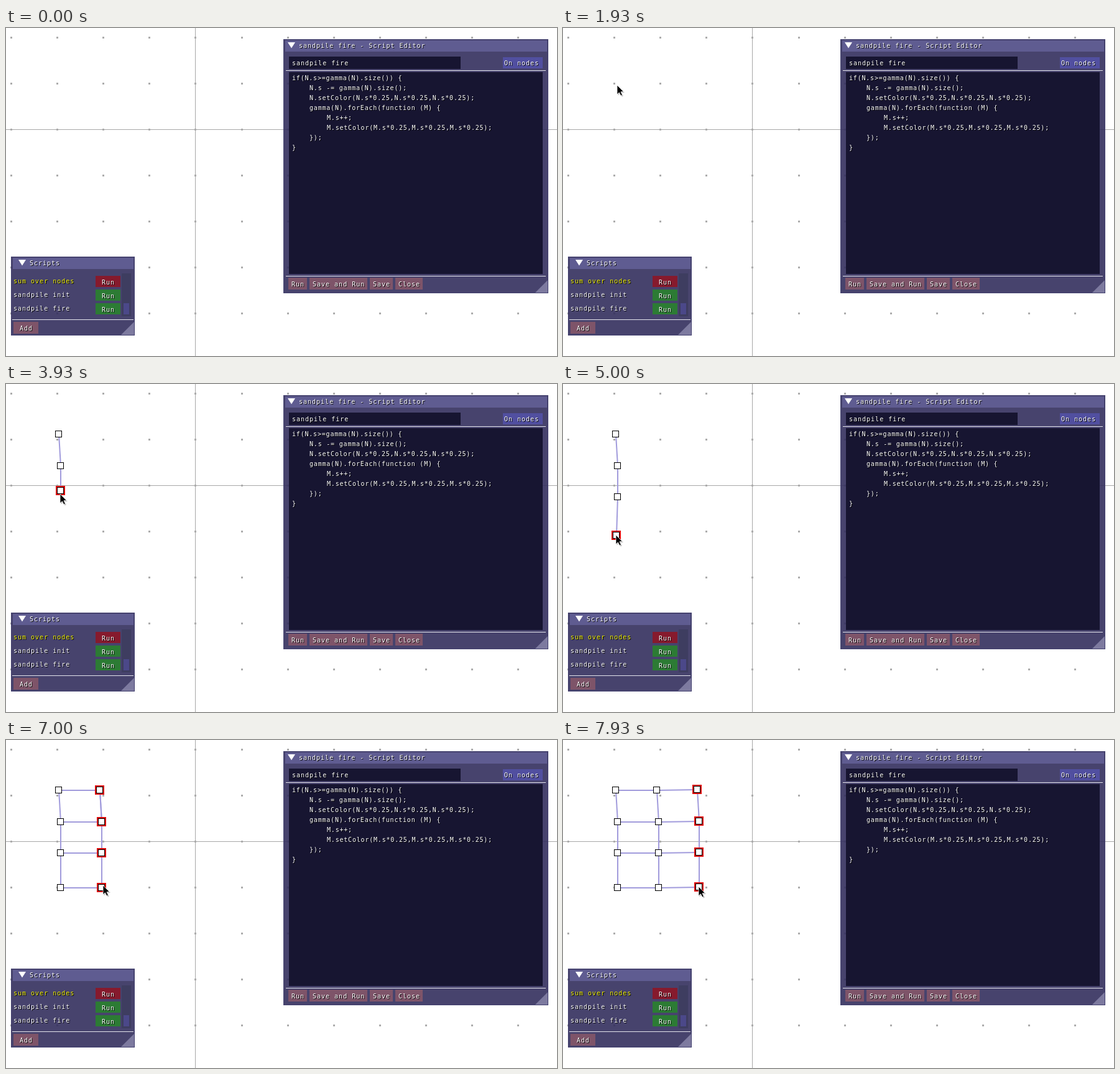
Write an HTML page with a canvas that moves like this. It is 886 px wide and 528 px high and loops after 8000 ms.

```html
<!DOCTYPE html>
<html lang="en">
<head>
<meta charset="utf-8">
<title>Sandpile script editor</title>
<style>
html, body { margin: 0; width: 100%; height: 100%; overflow: hidden; background: #fff; }
canvas { display: block; width: 886px; height: 528px; }
</style>
</head>
<body>
<canvas id="stage" width="886" height="528"></canvas>
<script>
const LOOP = 8000, STEP = 200 / 3, CELL = 7;
const DARK = '#171531', ROSE = '#7e5469', RULE = '#e4e4ec';
const g = document.getElementById('stage').getContext('2d');

const CODE = `if(N.s>=gamma(N).size()) {
    N.s -= gamma(N).size();
    N.setColor(N.s*0.25,N.s*0.25,N.s*0.25);
    gamma(N).forEach(function (M) {
        M.s++;
        M.setColor(M.s*0.25,M.s*0.25,M.s*0.25);
    });
}`.split('\n');

// Hand strokes: start, end, and the point reached; the hand rests in between
const APPEAR = 730, ORIGIN = [301, 55];
const STROKES = [
  [933, 1333, 27, 92], [1333, 1467, 88, 98], [1867, 2133, 84, 80],
  [2800, 3267, 87, 131], [3533, 4033, 87, 181], [4200, 4667, 85, 243], [5000, 5067, 87, 237],
  [6000, 6133, 98, 230], [6133, 6400, 130, 238], [6533, 6800, 153, 237],
  [6933, 7133, 160, 230], [7133, 7400, 201, 236], [7400, 7733, 250, 236], [7733, 7867, 218, 236]
];
// Four single nodes, then two copied columns; each is dragged until the next one is born
const ROWS = 4, BORN = [2467, 2867, 3533, 4267, 6067, 7000, LOOP];
const SELECT_ALL = 5730;

function hand(t) {
  let [x, y] = ORIGIN;
  for (const [start, end, toX, toY] of STROKES) {
    if (t <= start) break;
    const p = 1 - (1 - Math.min(1, (t - start) / (end - start))) ** 1.5;
    x += (toX - x) * p;
    y += (toY - y) * p;
  }
  return [Math.round(x), Math.round(y)];
}

// Dragged things trail the hand by one step
const dragged = (i, t) => hand(Math.min(t, BORN[i + 1]) - STEP);

function columnsAt(t) {
  const count = BORN.filter(b => t >= b - 5).length;
  const columns = [];
  for (let i = 0; i < count; i++) {
    const p = dragged(i, t);
    if (i === 0) columns.push([p]);
    else if (i < ROWS) columns[0].push(p);
    else {
      const prev = columns[columns.length - 1], foot = prev[ROWS - 1];
      columns.push(prev.map(([x, y]) => [x + p[0] - foot[0], y + p[1] - foot[1]]));
    }
  }
  return columns;
}

function box(x, y, w, h, color) {
  g.fillStyle = color;
  g.fillRect(x, y, w, h);
}

function poly(points, color) {
  g.beginPath();
  points.forEach(([x, y]) => g.lineTo(x, y));
  g.closePath();
  g.fillStyle = color;
  g.fill();
}

function label(s, x, y, color = '#fff', spacing = 1) {
  g.font = '10px "DejaVu Sans Mono", monospace';
  g.letterSpacing = spacing + 'px';
  g.fillStyle = '#000';
  g.fillText(s, x + 1, y + 1);
  g.fillStyle = color;
  g.fillText(s, x, y);
}

// Returns the width, so that buttons can be set in a row
function button(s, x, y, h, color, pad) {
  const w = s.length * CELL + 2 * pad;
  box(x, y, w, h, color);
  label(s, Math.round(x + pad), y + 14);
  return w;
}

function grid() {
  box(0, 0, 886, 528, '#fff');
  box(304, 0, 1, 528, '#a8a8a8');
  box(0, 163, 886, 1, '#a8a8a8');
  for (let i = 0; i < 12; i++)
    for (let j = 0; j < 7; j++)
      box(Math.round(7 + i * 74.1), 14 + j * 74, 3, 3, '#adadad');
}

function panel(title, x, y, w, h, indent, grip) {
  const right = x + w - 1, bottom = y + h - 1, tx = x + indent, ty = y + 5;
  box(x, y, w, h, 'rgba(52,47,94,.9)');
  g.strokeStyle = '#42406f';
  g.lineWidth = 1;
  g.strokeRect(x + .5, y + .5, w - 1, h - 1);
  box(x + 3, y + 2, w - 5, 18, '#5f5c91');
  poly([[right, bottom - grip], [right, bottom], [right - grip, bottom]], '#7d7a9f');
  poly([[tx, ty], [tx + 12, ty], [tx + 6, ty + 9.5]], '#fff');
  label(title, tx + 18, y + 14);
}

function editor() {
  panel('sandpile fire - Script Editor', 446, 18, 426, 409, 7, 20);
  box(455, 46, 276, 20, DARK);
  label('sandpile fire', 460, 60);
  box(799, 47, 64, 18, '#514fa0');
  label('On nodes', 801, 60);
  box(450, 68, 418, 1, RULE);
  box(455, 71, 408, 325, DARK);
  CODE.forEach((line, i) => {
    const text = line.trimStart(), indent = line.length - text.length;
    label(text, 460 + indent * CELL, 84 + i * 16, '#fff', .8);
  });
  box(450, 399, 418, 1, RULE);
  let x = 454;
  for (const s of ['Run', 'Save and Run', 'Save', 'Close'])
    x += button(s, x, 402, 19, ROSE, 4.5) + 4;
}

function scripts() {
  panel('Scripts', 8, 368, 199, 127, 12, 21);
  ['sum over nodes', 'sandpile init', 'sandpile fire'].forEach((name, i) => {
    const y = 399 + i * 22;
    label(name, 12, y + 12, i ? '#fff' : '#f0f000');
    button('Run', 144, y, 18, i ? '#2c7b34' : '#861a2d', 9.5);
  });
  box(186, 395, 15, 69, '#3e3d60');
  box(189, 443, 9, 18, '#4b4889');
  box(10, 469, 195, 1, RULE);
  button('Add', 12, 473, 19, ROSE, 9.5);
}

function edge(a, b) {
  g.beginPath();
  g.moveTo(a[0] + 1, a[1] + 1);
  g.lineTo(b[0] + 1, b[1] + 1);
  g.strokeStyle = '#a19bdc';
  g.lineWidth = 2;
  g.stroke();
}

function node([x, y], selected) {
  if (selected) box(x - 7, y - 7, 15, 15, '#e00808');
  box(x - 5, y - 5, 11, 11, '#000');
  box(x - 4, y - 4, 9, 9, '#fff');
}

function graph(t) {
  const columns = columnsAt(t), last = columns.length - 1;
  columns.forEach((col, c) => col.forEach((p, r) => {
    if (r) edge(col[r - 1], p);
    if (c) edge(columns[c - 1][r], p);
  }));
  columns.forEach((col, c) => col.forEach((p, r) =>
    node(p, c === last && (t > SELECT_ALL || r === col.length - 1))));
}

function cursor([x, y]) {
  const arrow = [[0, 0], [0, 15], [3.4, 11.8], [6, 17], [8.4, 16], [6, 10.8], [10.5, 10.5]];
  const shifted = d => arrow.map(([dx, dy]) => [x + dx + d, y + dy + d]);
  poly(shifted(1.5), 'rgba(0,0,0,.25)');
  poly(shifted(0), '#000');
  g.strokeStyle = '#fff';
  g.lineWidth = .8;
  g.stroke();
}

function draw(now) {
  const t = Math.floor((now % LOOP + 5) / STEP) * STEP;
  grid();
  graph(t);
  scripts();
  editor();
  if (t > APPEAR) cursor(hand(t));
}

const start = performance.now();
function tick() {
  draw(performance.now() - start);
  requestAnimationFrame(tick);
}
tick();
</script>
</body>
</html>
```
